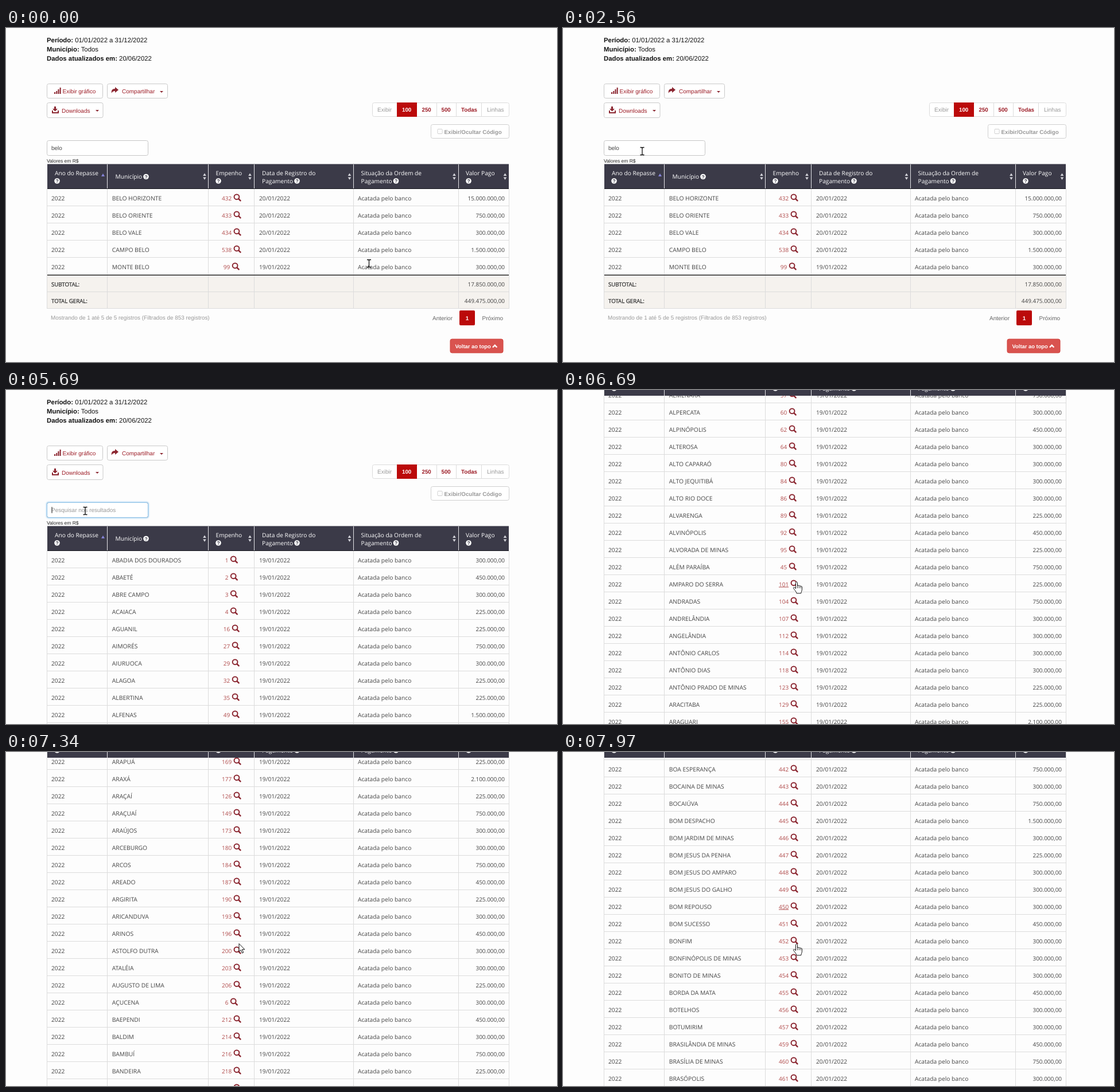
Write an HTML page that moves like this. It is 960 px wide and 583 px high and loops after 8000 ms.

```html
<!DOCTYPE html>
<html lang="pt-BR">
<head>
<meta charset="utf-8">
<title>Repasses</title>
<style>
html, body { margin: 0; width: 100%; height: 100%; overflow: hidden; background: #fdfdfd; }
svg { display: block; width: 960px; height: 583px; text-rendering: geometricPrecision; }
text { font: 10px "Liberation Sans", Arial, sans-serif; white-space: pre; }
.cell { font: 10.2px "Open Sans", "Noto Sans", sans-serif; fill: #444; }
.head { font: 10.2px "Open Sans", "Noto Sans", sans-serif; fill: #fff; }
.name { font-size: 10.33px; }
.money { font-size: 9.95px; }
.link { font-size: 10px; fill: #b04a4a; }
.total { font-size: 9.7px; fill: #333; stroke: #333; stroke-width: .3px; }
.info { font-size: 11.35px; fill: #111; }
.bold { font-weight: bold; font-size: 9.75px; }
.note { font-size: 9.9px; }
.small { font-size: 8.5px; }
.top { font-size: 9.4px; }
.red { fill: #9c1c26; }
.gray { fill: #999; }
</style>
</head>
<body>
<svg id="stage" viewBox="0 0 960 583"></svg>
<script>
const NS = "http://www.w3.org/2000/svg";
const LOOP = 8000, ROW = 30, LIST_AT = 4670;
const EDGES = [71.5, 176.5, 352.5, 432.5, 605.5, 788.5, 876.5];
const WINE = "#8c2832", RED = "#bb0a0a", LINE = "#dcdcdc";

function add(parent, tag, attrs = {}, text) {
  const el = document.createElementNS(NS, tag);
  for (const k in attrs) el.setAttribute(k, attrs[k]);
  if (text !== undefined) el.textContent = text;
  parent.appendChild(el);
  return el;
}
const group = parent => add(parent, "g");
const label = (p, x, y, s, cls = "", more = {}) => add(p, "text", { x, y, class: cls, ...more }, s);
const path = (p, d, more = {}) => add(p, "path", { d, fill: "none", ...more });
const box = (p, x, y, width, height, fill, stroke = "none", rx = 0) =>
  add(p, "rect", { x, y, width, height, fill, stroke, rx });
const show = (el, on) => el.setAttribute("display", on ? "inline" : "none");
const move = (el, x, y) => el.setAttribute("transform", `translate(${x} ${y})`);

// Each entry: name|number and amount letter; a missing number follows the one before.
const AMOUNTS = { a: 225, b: 300, c: 450, d: 750, e: 1500, f: 2100, g: 4500, h: 15000 };
const FOUND = "BELO HORIZONTE|432h,BELO ORIENTE|d,BELO VALE|b,CAMPO BELO|538e,MONTE BELO|99b";
const ALL = `ABADIA DOS DOURADOS|1b,ABAETÉ|c,ABRE CAMPO|b,ACAIACA|a,AGUANIL|16a,AIMORÉS|27d,AIURUOCA|29b,
ALAGOA|32a,ALBERTINA|35a,ALFENAS|49e,ALFREDO VASCONCELOS|53b,ALMENARA|57d,ALPERCATA|60b,ALPINÓPOLIS|62c,
ALTEROSA|64b,ALTO CAPARAÓ|80b,ALTO JEQUITIBÁ|84b,ALTO RIO DOCE|86b,ALVARENGA|89a,ALVINÓPOLIS|92c,
ALVORADA DE MINAS|95a,ALÉM PARAÍBA|45d,AMPARO DO SERRA|101a,ANDRADAS|104d,ANDRELÂNDIA|107b,ANGELÂNDIA|112b,
ANTÔNIO CARLOS|114b,ANTÔNIO DIAS|118b,ANTÔNIO PRADO DE MINAS|123a,ARACITABA|129a,ARAGUARI|155f,ARANTINA|159a,
ARAPONGA|162b,ARAPORÃ|165b,ARAPUÁ|169a,ARAXÁ|177f,ARAÇAÍ|126a,ARAÇUAÍ|149d,ARAÚJOS|173b,ARCEBURGO|180b,
ARCOS|184d,AREADO|187c,ARGIRITA|190a,ARICANDUVA|193b,ARINOS|196c,ASTOLFO DUTRA|200b,ATALÉIA|203b,
AUGUSTO DE LIMA|206a,AÇUCENA|6b,BAEPENDI|212c,BALDIM|214b,BAMBUÍ|216d,BANDEIRA|218a,BANDEIRA DO SUL|b,
BARBACENA|222f,BARRA LONGA|225b,BARROSO|228c,BARÃO DE COCAIS|220d,BARÃO DE MONTE ALTO|b,
BELA VISTA DE MINAS|430b,BELMIRO BRAGA|a,BELO HORIZONTE|h,BELO ORIENTE|d,BELO VALE|b,BERILO|b,BERIZAL|a,
BERTÓPOLIS|a,BETIM|g,BIAS FORTES|a,BICAS|b,BIQUINHAS|a,BOA ESPERANÇA|d,BOCAINA DE MINAS|b,BOCAIÚVA|d,
BOM DESPACHO|e,BOM JARDIM DE MINAS|b,BOM JESUS DA PENHA|a,BOM JESUS DO AMPARO|b,BOM JESUS DO GALHO|b,
BOM REPOUSO|b,BOM SUCESSO|c,BONFIM|b,BONFINÓPOLIS DE MINAS|b,BONITO DE MINAS|b,BORDA DA MATA|c,BOTELHOS|b,
BOTUMIRIM|b,BRASILÂNDIA DE MINAS|459c,BRASÍLIA DE MINAS|d,BRASÓPOLIS|b,BRAÚNAS|a`;

const money = n => String(n * 1000).replace(/\B(?=(\d{3})+$)/g, ".") + ",00";

function parse(list) {
  let last = 0;
  return list.split(",").map(item => {
    const [name, code] = item.trim().split("|");
    last = parseInt(code) || last + 1;
    return { name, num: last, pay: money(AMOUNTS[code.slice(-1)]) };
  });
}

function columns(p, top, bottom, stroke) {
  for (const x of EDGES) path(p, `M${x} ${top}V${bottom}`, { stroke });
}

function magnifier(p, x, y) {
  add(p, "circle", { cx: x + 5.3, cy: y + 5.3, r: 4.4, fill: "none", stroke: WINE, "stroke-width": 2 });
  path(p, `M${x + 8.8} ${y + 8.8}l3 3`, { stroke: WINE, "stroke-width": 2.5, "stroke-linecap": "round" });
}

// Draws the rows and returns the number links.
function table(p, rows) {
  const bottom = 281 + rows.length * ROW;
  const links = rows.map((r, i) => {
    const y = 300.5 + i * ROW;
    label(p, 79, y, "2022", "cell");
    label(p, 184.8, y, r.name, "cell name");
    const w = String(r.num).length * 5.72, x = 392.8 - (w + 16.5) / 2;
    const link = label(p, x, y, r.num, "cell link");
    magnifier(p, x + w + 3.5, y - 11);
    label(p, 441, y, (r.num < 430 ? 19 : 20) + "/01/2022", "cell");
    label(p, 613, y, "Acatada pelo banco", "cell");
    label(p, 869, y, r.pay, "cell money", { "text-anchor": "end" });
    path(p, `M72 ${y + 10}H877`, { stroke: LINE });
    return link;
  });
  columns(p, 281, bottom, LINE);
  return links;
}

function button(p, x, y, w, h, s, tx) {
  box(p, x, y, w, h, "#fff", "#c9c9c9", 3);
  label(p, tx, y + h / 2 + 4, s, "red");
}
const caretDown = (p, x, y) => path(p, `M${x - 3} ${y - 1}h6l-3 3z`, { fill: WINE });

function drawTop(p) {
  [["Período:", "01/01/2022 a 31/12/2022"], ["Município:", "Todos"], ["Dados atualizados em:", "20/06/2022"]]
    .forEach(([k, v], i) => {
      const t = label(p, 71, 24.5 + 16 * i, "", "info");
      add(t, "tspan", { "font-weight": "bold" }, k);
      add(t, "tspan", {}, " " + v);
    });
  button(p, 71.5, 97.5, 97, 25, "Exibir gráfico", 98.5);
  [3, 5, 8, 11].forEach((h, i) => box(p, 84 + i * 3.2, 115 - h, 2.1, h, WINE));
  button(p, 176.5, 97.5, 105, 25, "Compartilhar", 202);
  path(p, "M184 114c-1-5 1-8 6-8v-3l6 5-6 5v-3c-3 0-5 1-6 4z", { fill: WINE });
  caretDown(p, 271, 111);
  button(p, 71.5, 130.5, 97.5, 26, "Downloads", 97);
  path(p, "M84 137h3v4h3l-4.5 4.5l-4.5-4.5h3z", { fill: WINE });
  path(p, "M81 144v4h10v-4", { stroke: WINE, "stroke-width": 2 });
  caretDown(p, 159, 144);

  box(p, 638.5, 130.5, 238, 24, "#fff", LINE, 3);
  for (const x of [750.5, 784.5, 828.5]) path(p, `M${x} 131V154`, { stroke: LINE });
  box(p, 681, 130, 35, 25, RED);
  label(p, 647, 146, "Exibir", "gray");
  label(p, 690, 146, "100", "bold", { fill: "#fff" });
  label(p, 724.5, 146, "250", "bold red");
  label(p, 758.5, 146, "500", "bold red");
  label(p, 793, 146, "Todas", "bold red");
  label(p, 838, 146, "Linhas", "gray");
  box(p, 740.5, 168.5, 136, 24, "#fff", "#cfcfcf", 3);
  box(p, 752, 176.5, 8, 8, "#fff", "#d0d0d0", 1);
  label(p, 763.5, 184.5, "Exibir/Ocultar Código", "bold gray");
  label(p, 71, 235, "Valores em R$", "small", { fill: "#222" });
  path(p, "M72 280.5H876", { stroke: "#15151c" });
}

function drawHead(p) {
  box(p, 72, 237.5, 804, 42.5, "#3b3a48");
  for (const x of EDGES.slice(1, -1)) path(p, `M${x} 238V280`, { stroke: "#e4e4e8" });
  const help = (x, y) => {
    add(p, "circle", { cx: x, cy: y, r: 4.8, fill: "#fff" });
    label(p, x, y + 3.1, "?", "bold small", { fill: "#3b3a48", "text-anchor": "middle" });
  };
  [[85, "Ano do Repasse", "", 89], [365.5, "Empenho", "", 370], [446, "Data de Registro do", "Pagamento", 507],
   [618.5, "Situação da Ordem de", "Pagamento", 679.5], [801, "Valor Pago", "", 806]]
    .forEach(([x, a, b, hx]) => {
      label(p, x, 256.5, a, "head");
      label(p, x, 270.5, b, "head");
      help(hx, 267);
    });
  label(p, 190.5, 263, "Município", "head");
  help(244, 259.5);
  path(p, "M166 259h6l-3-5z", { fill: "#8583d8" });
  for (const x of [346, 425, 598.5, 781, 869.5])
    path(p, `M${x - 2.8} 258h5.6l-2.8-4.5zm0 2.5h5.6l-2.8 4.5z`, { fill: "#d4d4da" });
}

function drawFound(p) {
  box(p, 72, 431, 804.5, 59, "#f5f2ee");
  table(p, parse(FOUND));
  columns(p, 431, 490, LINE);
  path(p, "M72 460.5H876M72 489.5H876", { stroke: LINE });
  path(p, "M72 431.3H876", { stroke: "#111", "stroke-width": 1.3 });
  label(p, 79, 450.5, "SUBTOTAL:", "cell total");
  label(p, 79, 479.5, "TOTAL GERAL:", "cell total");
  label(p, 869, 450.5, money(17850), "cell money", { "text-anchor": "end" });
  label(p, 869, 479.5, money(449475), "cell money", { "text-anchor": "end" });
  label(p, 78, 509, "Mostrando de 1 até 5 de 5 registros (Filtrados de 853 registros)", "gray note");
  label(p, 743, 510, "Anterior", "", { fill: "#666" });
  box(p, 790, 493, 27, 26, RED, "none", 2);
  label(p, 803.5, 510, "1", "bold", { fill: "#fff", "text-anchor": "middle" });
  label(p, 829.5, 510, "Próximo", "", { fill: "#666" });
  box(p, 774, 543, 92, 24, "#d9534f", "#d0403b", 3);
  label(p, 782.5, 558.5, "Voltar ao topo", "bold top", { fill: "#fff" });
  path(p, "M848 557.5l3.7-3.7l3.7 3.7", { stroke: "#fff", "stroke-width": 2.4 });
}

const stage = document.getElementById("stage");
const page = group(stage);
drawTop(page);

const glow = group(page);
[[6, .1], [4, .16], [2, .25]].forEach(([w, o]) =>
  add(glow, "rect", { x: 71.5, y: 196.5, width: 176, height: 26, rx: 3, fill: "none",
    stroke: "#66afe9", "stroke-width": w, "stroke-opacity": o }));
box(page, 71.5, 196.5, 176, 26, "#fff", "#c6c6c6", 3);
const focusLine = box(page, 71.5, 196.5, 176, 26, "none", "#8fc1e6", 3);
const typed = label(page, 79, 213, "belo", "", { fill: "#444" });
const hint = label(page, 79, 213, "Pesquisar nos resultados", "gray");
const caret = box(page, 0, 204, 1, 11, "#222");

const found = group(page), all = group(page);
drawFound(found);
const links = table(all, parse(ALL));
const head = group(stage);
drawHead(head);

const cursors = { beam: group(stage), arrow: group(stage), hand: group(stage) };
path(cursors.beam, "M-3.5-6.5h2.5l1 1l1-1h2.5M0-5.5V5.5M-3.5 6.5h2.5l1-1l1 1h2.5", { stroke: "#111", "stroke-width": 1.3 });
const ink = { fill: "#fff", stroke: "#111", "stroke-linejoin": "round" };
path(cursors.arrow, "M.5-2v14l3.2-3l2.3 5.5l2.2-1l-2.3-5.3h4.5z", ink);
path(cursors.hand, "M0 0c0-2 3-2 3 0v5.5c.3-1.5 2.7-1.3 2.8.3c.5-1.3 2.6-.9 2.7.6c.7-1 2.4-.4 2.4 1v4c0 3-1.5 4-1.7 7H1.5c-.4-3-3.3-5.5-5.2-8.500c-1-1.600.8-2.600 2-1.500L0 10z", ink);
path(cursors.hand, "M3 5.5v4M5.8 6v3.5M8.5 6.5v3", { stroke: "#111", "stroke-width": .8 });

// time, scroll offset, hovered row
const SCROLL = [
  [0, 0, -1], [6250, 0, 1], [6390, 110, -1], [6540, 350, 14], [6690, 618, 22], [6820, 830, 29],
  [6960, 1050, -1], [7100, 1236, -1], [7220, 1300, -1], [7345, 1490, 51], [7470, 1690, 57],
  [7600, 1838, 61], [7720, 2040, 69], [7850, 2240, 75], [7970, 2397, 79]
];

// Progress from 0 to 1 in n hard steps, the first at a and the last at b.
const stepped = (t, a, b, n) =>
  t < a ? 0 : Math.min(n, Math.floor((t - a) / (b - a) * (n - 1) + 1e-6) + 1) / n;
const mix = (a, b, k) => a + (b - a) * k;

function pointer(t, hover) {
  if (t >= 6250) return [hover < 0 ? "arrow" : "hand", 405.5, 336.5];
  if (t >= 6110) return ["arrow", 270, 275];
  if (t >= 2720) return ["beam", 138, 211];
  if (t >= 1550) {
    const k = stepped(t, 1550, 2560, 8), e = k * k * (3 - 2 * k);
    const y = mix(415, 215, e);
    return [y > 225 && y < 285 ? "arrow" : "beam", mix(332, 138, e), y];
  }
  const k = stepped(t, 400, 1400, 8);
  return ["beam", 632.5 - 300 * k, 411 + 4 * k - 41 * Math.sin(2 * Math.PI * k)];
}

function caretOn(t) {
  return t >= 5690 ? t < 6250 : t >= 2870 && t < 3420 || t >= 3970 && t < 4520;
}

let hovered;
function draw(t) {
  const [, scroll, hover] = SCROLL.findLast(s => s[0] <= t);
  const listed = t >= LIST_AT;
  move(page, 0, -scroll);
  move(head, 0, Math.max(-scroll, -270));
  show(found, !listed);
  show(all, listed);
  show(typed, !listed);
  show(hint, listed);

  const focus = stepped(t, 2870, 3020, 2);
  glow.setAttribute("opacity", focus);
  focusLine.setAttribute("opacity", focus);
  caret.setAttribute("x", listed ? 79.5 : 98);
  show(caret, caretOn(t));

  if (hovered) hovered.removeAttribute("text-decoration");
  hovered = links[hover];
  if (hovered) hovered.setAttribute("text-decoration", "underline");

  const [kind, x, y] = pointer(t, hover);
  for (const k in cursors) show(cursors[k], k === kind);
  move(cursors[kind], x, y);
}

const start = performance.now();
function tick() {
  draw((performance.now() - start) % LOOP);
  requestAnimationFrame(tick);
}
tick();
</script>
</body>
</html>
```
